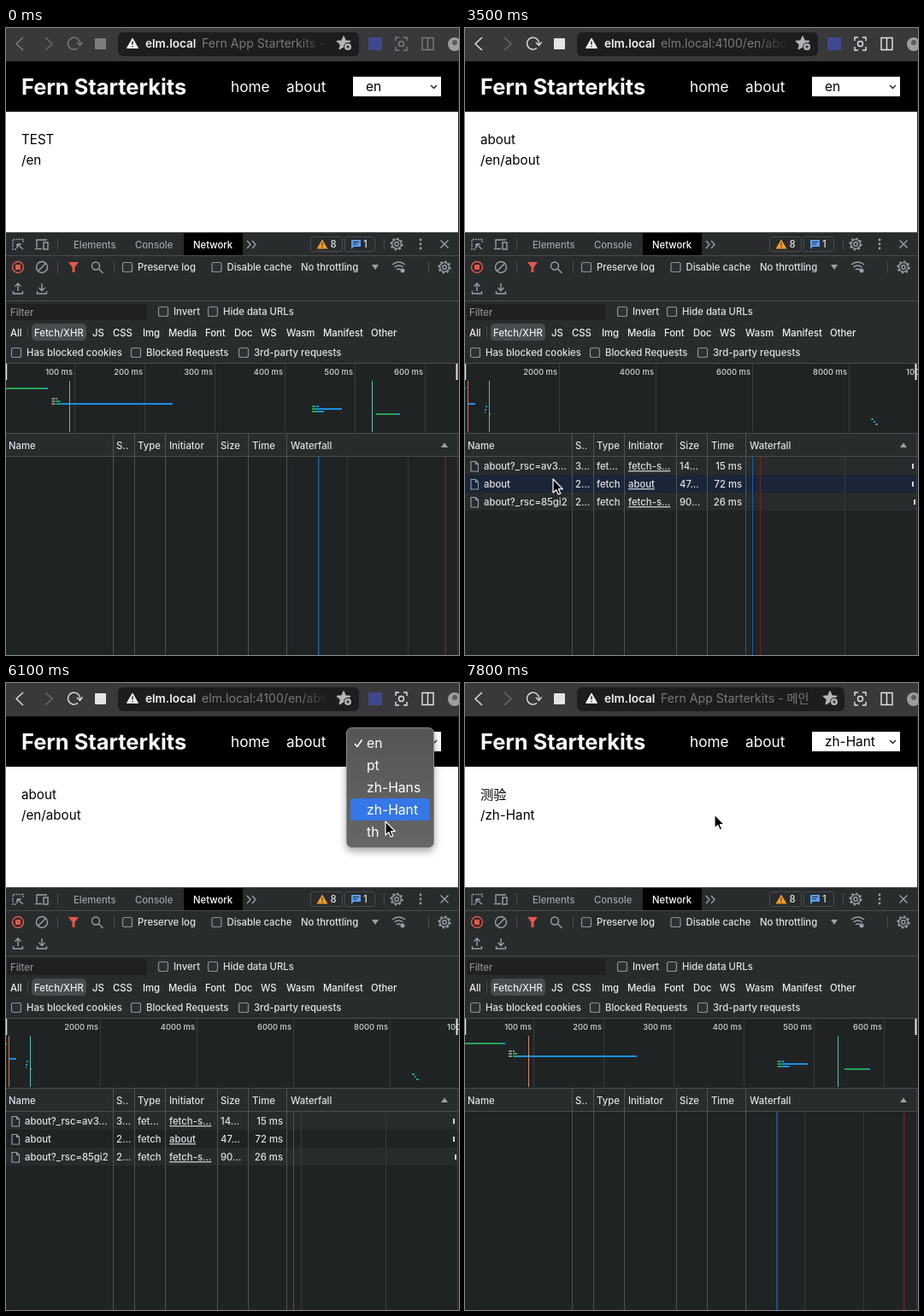
Recreate the animation shown at these times as an HTML page. Size 530 px wide and 734 px high, loop 8 s.

```html
<!DOCTYPE html>
<html lang="en">
<head>
<meta charset="utf-8">
<title>Language switch demo</title>
<style>
html, body { margin: 0; width: 100%; height: 100%; overflow: hidden; background: #202324; }
svg { display: block; width: 530px; height: 734px; font-family: Inter, "Noto Sans CJK SC", "Noto Sans CJK KR", sans-serif; }
text { white-space: pre; }
.ico { fill: none; stroke: #9aa0a6; stroke-width: 1.4; }
.tools { font-weight: 500; }

/* state switches */
.first, .home, .second, .about, .third, .hant, .idle, .live, .menu, .spot, .r0, .r1, .r2, .cursor { animation: 8s step-end infinite; }
.home { animation-name: home; }
.about { animation-name: about; }
.hant { animation-name: hant; }
.first { animation-name: first; }
.second { animation-name: second; }
.third { animation-name: third; }
.live { animation-name: live; }
.idle { animation-name: idle; }
.menu { animation-name: menu; }
.spot { animation-name: spot; }
.r0 { animation-name: r0; }
.r1 { animation-name: r1; }
.r2 { animation-name: r2; }
.cursor { animation-name: cursor; }
@keyframes home { 0% { visibility: visible } 32.5%, 100% { visibility: hidden } }
@keyframes about { 0% { visibility: hidden } 32.5% { visibility: visible } 86.25%, 100% { visibility: hidden } }
@keyframes hant { 0% { visibility: hidden } 86.25%, 100% { visibility: visible } }
@keyframes first { 0% { visibility: visible } 33.75%, 100% { visibility: hidden } }
@keyframes second { 0% { visibility: hidden } 33.75% { visibility: visible } 85%, 100% { visibility: hidden } }
@keyframes third { 0% { visibility: hidden } 87.5%, 100% { visibility: visible } }
@keyframes idle { 0% { visibility: visible } 17.5%, 100% { visibility: hidden } }
@keyframes live { 0% { visibility: hidden } 17.5%, 100% { visibility: visible } }
@keyframes menu { 0% { visibility: hidden } 65% { visibility: visible } 82.5%, 100% { visibility: hidden } }
@keyframes spot {
  0% { transform: translateY(0) } 67.5% { transform: translateY(26px) } 68.75% { transform: translateY(52px) }
  71.25% { transform: translateY(78px) } 72.5% { transform: translateY(104px) } 76.25%, 100% { transform: translateY(78px) }
}
@keyframes r0 { 0% { visibility: hidden } 53.75% { visibility: visible } 55%, 100% { visibility: hidden } }
@keyframes r1 { 0% { visibility: hidden } 43.75% { visibility: visible } 45%, 100% { visibility: hidden } }
@keyframes r2 { 0% { visibility: hidden } 45% { visibility: visible } 46.25% { visibility: hidden } 52.5% { visibility: visible } 53.75%, 100% { visibility: hidden } }
@keyframes cursor {
  0% { transform: translate(277px, 760px) }
  1.25% { transform: translate(277px, 645px); animation-timing-function: steps(2) }
  3.75% { transform: translate(427px, 275px) }
  5% { transform: translate(427px, 275px); animation-timing-function: steps(9) }
  16.25% { transform: translate(361px, 76px); animation-timing-function: steps(6) }
  23.75% { transform: translate(357px, 71px) }
  30% { transform: translate(357px, 71px); animation-timing-function: steps(8) }
  40% { transform: translate(260px, 217px) }
  42.5% { transform: translate(185px, 390px) }
  43.75% { transform: translate(103px, 528px); animation-timing-function: steps(5) }
  50% { transform: translate(72px, 597px); animation-timing-function: steps(2) }
  52.5% { transform: translate(80px, 563px); animation-timing-function: steps(6) }
  60% { transform: translate(300px, 290px); animation-timing-function: steps(3) }
  63.75% { transform: translate(441px, 67px) }
  65% { transform: translate(441px, 63px) }
  66.25% { transform: translate(441px, 63px); animation-timing-function: steps(5) }
  72.5% { transform: translate(446px, 178px) }
  73.75% { transform: translate(446px, 178px); animation-timing-function: steps(3) }
  77.5% { transform: translate(443px, 154px) }
  85% { transform: translate(443px, 154px); animation-timing-function: steps(6) }
  92.5% { transform: translate(375px, 187px) }
  95% { transform: translate(375px, 187px); animation-timing-function: steps(2) }
  97.5%, 100% { transform: translate(292px, 154px) }
}
</style>
</head>
<body>
<svg id="stage" viewBox="0 0 530 734"></svg>
<script>
const GREEN = '#25a455', BLUE = '#1a8fe0', GREY = '#85898d', LIGHT = '#dfe1e4', DIM = '#9aa0a6', EDGE = '#494c4e';

const box = (x, y, w, h, fill, more = '') => `<rect x="${x}" y="${y}" width="${w}" height="${h}" fill="${fill}" ${more}/>`;
const hline = (y, c = EDGE) => box(0, y, 530, 1, c);
const vline = (x, y, h, c = EDGE, w = 1) => box(x, y, w, h, c);
// y is the middle of the capitals
const text = (x, y, s, fill = LIGHT, size = 11.3, more = '') =>
  `<text x="${x}" y="${y + size * .364}" fill="${fill}" font-size="${size}" ${more}>${s}</text>`;
const path = (d, more = '') => `<path class="ico" d="${d}" ${more}/>`;
const group = (cls, ...parts) => `<g class="${cls}">${parts.join('')}</g>`;
const at = (x, y, s) => `<g transform="translate(${x} ${y})">${s}</g>`;
const check = (x, y, label) =>
  box(x - 5.5, y - 5.5, 11, 11, '#2e3133', 'rx="2" stroke="#8d9195" stroke-width="1.2"') + text(x + 12, y, label);

function star(x) {
  let d = '';
  for (let i = 0; i < 10; i++) {
    const a = i * Math.PI / 5 - Math.PI / 2, r = i % 2 ? 3.6 : 8;
    d += (i ? 'L' : 'M') + (Math.cos(a) * r).toFixed(1) + ' ' + (Math.sin(a) * r).toFixed(1);
  }
  return at(x, 18, `<path d="${d}Z" fill="#b4b5b7" stroke="#b4b5b7" stroke-width="1.5" stroke-linejoin="round"/>
    <circle cx="5" cy="4" r="5" fill="#1d1d1f"/><circle cx="5" cy="4" r="4" fill="#b4b5b7"/>
    <path d="M3 4h4M5 2v4" stroke="#1d1d1f"/>`);
}

function gear(x, y) {
  return at(x, y, `<circle r="5.4" class="ico"/><circle r="2.2" class="ico"/>
    <circle r="6.7" class="ico" style="stroke-width:1.8;stroke-dasharray:2.4 2.86"/>`);
}

function browserIcons(c) {
  const s = `style="stroke:${c}"`;
  return path('M20 11l-8 7.5 8 7.5', s) + path('M84 23.5a7 7 0 1 1 2.5-5M83 17l3.5 3.5 3-4', s)
    + box(104, 12, 13, 13, c, 'rx="1"')
    + path('M456 15v-4h4M465 11h4v4M469 22v4h-4M460 26h-4v-4', s) + `<circle cx="462.5" cy="18.5" r="3" class="ico" ${s}/>`
    + path('M487 11.5h13v14h-13zM493.5 11.5v14', s);
}

function browser() {
  const host = text(163, 18, 'elm.local', '#f1f1f2', 13.6, 'font-weight="600"');
  const pill = (w) => box(131, 5, w, 28, '#1d1d1f', 'rx="6"');
  const warn = `<path d="M148 12l6.5 11.5h-13z" fill="#f1f1f2" stroke="#f1f1f2" stroke-linejoin="round"/><path d="M148 15.5v4M148 21v1.3" stroke="#1d1d1f" stroke-width="1.4"/>`;
  const title = (s) => text(229, 18, s, '#77797c', 14.1);
  const flagIcon = box(424, 11, 16, 15, '#41488f');
  const cut = box(340, 8, 38, 22, 'url(#fade)') + box(378, 8, 34, 22, '#1d1d1f') + star(395);
  return box(0, 0, 530, 39, '#39393b')
    + group('idle', browserIcons('#7c7d7f')) + group('live', browserIcons('#e4e4e6'))
    + path('M46 11l8 7.5-8 7.5', 'style="stroke:#69696b"')
    + `<circle cx="525" cy="19" r="8" fill="#9d9da0"/><circle cx="525" cy="17" r="3" fill="#5b5b5e"/>`
    + group('home', pill(282), title('Fern App Starterkits -'), cut, flagIcon)
    + group('about', pill(282), title('elm.local:4100/en/about'), cut, flagIcon)
    + group('hant', pill(313), title('Fern App Starterkits - 메인'), star(427))
    + warn + host;
}

function page() {
  const body = (cls, a, b) => group(cls, text(18, 130, a, '#000', 15.2), text(18, 154, b, '#000', 15.2));
  const value = (cls, s) => group(cls, text(421, 68.5, s, '#000', 15.4));
  return box(0, 39, 530, 59, '#000') + box(0, 98, 530, 141, '#fff')
    + text(18, 68.5, 'Fern Starterkits', '#fff', 25.4, 'font-weight="700"')
    + text(263, 68.5, 'home', '#fff', 17.2) + text(328, 68.5, 'about', '#fff', 17.2)
    + box(406, 57, 103, 23, '#fff')
    + path('M497 67l3.5 3.5 3.5-3.5', 'style="stroke:#222"')
    + value('home', 'en') + value('about', 'en') + value('hant', 'zh-Hant')
    + body('home', 'TEST', '/en') + body('about', 'about', '/en/about') + body('hant', '测验', '/zh-Hant')
    + vline(529, 39, 200, '#222');
}

function toolbars() {
  let s = box(0, 239, 530, 154, '#292c2d') + hline(239) + hline(266) + hline(319) + hline(392)
    + box(208, 240, 69, 26, '#000');
  s += path('M12 259H8v-11.5h12v4', 'style="stroke-dasharray:2 1.2"') + path('M13 253l7 6M13 253v5M13 253h5')
    + path('M36 257v-9h12M34 258.5h8M44 251h5v8h-5z') + vline(60, 246, 14);
  s += text(79, 253.5, 'Elements', DIM) + text(151, 253.5, 'Console', DIM) + text(219, 253.5, 'Network', '#fff')
    + path('M282 249l4 4.5-4 4.5M288 249l4 4.5-4 4.5');
  s += box(356.5, 244.5, 37, 17, 'none', `rx="2" stroke="${EDGE}"`) + `<path d="M370 247.5l6.5 11h-13z" fill="#f29a2e"/><path d="M370 251v4M370 256v1.3" stroke="#292c2d"/>`
    + text(379.5, 253, '8') + box(396.5, 244.5, 35, 17, 'none', `rx="2" stroke="${EDGE}"`)
    + `<path d="M404 248h11v8h-8l-3 3z" fill="#5a9cf0"/><path d="M406 250.5h7M406 253h5" stroke="#292c2d"/>` + text(418, 253, '1')
    + vline(442, 246, 14) + gear(457, 253)
    + [248, 253, 258].map(y => `<circle cx="485" cy="${y}" r="1.4" fill="${DIM}"/>`).join('')
    + path('M508.5 248.5l9 9M517.5 248.5l-9 9');
  s += `<circle cx="14" cy="280" r="6.5" class="ico" style="stroke:#e4564b"/>` + box(11, 277, 6, 6, '#e4564b', 'rx="1"')
    + `<circle cx="42" cy="280" r="6.5" class="ico"/>` + path('M46.5 275.5l-9 9') + vline(60, 273, 14)
    + `<path d="M73 274h12l-4.5 6v6h-3v-6z" fill="#e4564b"/>`
    + `<circle cx="105" cy="278.5" r="4.5" class="ico"/>` + path('M108.5 282l5 5') + vline(126, 273, 14)
    + check(142, 280, 'Preserve log') + check(246.5, 280, 'Disable cache')
    + text(345, 280, 'No throttling') + `<path d="M428 277h8l-4 6z" fill="${DIM}"/>`
    + path('M452 277q7.5-6 15 0M454.5 280q5-4 10 0M457 283q2.5-2 5 0') + `<circle cx="464" cy="284" r="2.5" fill="${DIM}"/>`
    + vline(494, 273, 14) + gear(513, 280)
    + path('M14 308v-9M10.5 302.5l3.5-3.5 3.5 3.5M8.5 308v3h11v-3') + path('M42 299v8M38.5 304l3.5 3.5 3.5-3.5M36.5 308v3h11v-3');
  s += box(2, 323, 163, 19, '#1e2021') + text(5, 333, 'Filter', '#8b8f93')
    + check(184, 332, 'Invert') + check(242, 332, 'Hide data URLs')
    + box(30, 346, 64, 20, '#494c4e', 'rx="5"') + vline(25, 349, 14);
  const types = { All: 5, 'Fetch/XHR': 33, JS: 101, CSS: 125, Img: 160, Media: 190, Font: 233, Doc: 267, WS: 298, Wasm: 328, Manifest: 371, Other: 427 };
  for (const k in types) s += text(types[k], 356.5, k, '#eceef0');
  return s + check(12, 380, 'Has blocked cookies') + check(152, 380, 'Blocked Requests') + check(278, 380, '3rd-party requests');
}

// [from, to, y, colour] strips of the overview
const strips = (list) => list.map(([a, b, y, c]) => box(a, y - 1, b - a, 2, c)).join('');

function ruler(first, gap, unit) {
  let s = '';
  for (let i = 0; first + i * gap < 600; i++) {
    const x = first + i * gap;
    if (x < 530) s += vline(x, 393, 80, '#383b3d');
    s += text(x - 2, 403, unit * (i + 1) + ' ms', '#d0d3d6', 9.4, 'text-anchor="end"');
  }
  return s;
}

function loadTrace(cls, k) {
  const { a, c, y, end, b, mid, tail, last, teal, grid, blue, red } = k;
  return group(cls, ruler(80, 82, 100),
    strips([[0, a, 422, GREEN], [a, a + 3, 422, BLUE],
      [c, c + 4, y, GREY], [c + 5, c + 7, y, GREY], [c, c + 4, y + 3, GREY], [c + 5, c + 10, y + 3, GREEN],
      [c, c + 4, y + 6, GREY], [c + 5, c + 10, y + 6, GREEN], [c + 10, end, y + 6, BLUE],
      [b, b + 4, 443, GREEN], [b + 5, b + 8, 443, BLUE], [b, b + 5, 446, GREEN], [b + 5, mid, 446, BLUE],
      [b, b + 6, 449, GREEN], [b + 6, b + 14, 449, BLUE], [tail, last, 452, GREEN], [last, last + 3, 452, BLUE]]),
    vline(74, 413, 60, '#c98a6c'), vline(teal, 413, 60, '#5cc0b4'),
    ...grid.map(x => vline(x, 502, 232, '#36393b')),
    vline(blue, 502, 232, '#1c66b0', 1.4), vline(red, 502, 232, '#7f1d1b', 1.4));
}

function requests() {
  const rows = [
    ['about?_rsc=av3…', '3…', 'fet…', 'fetch-s…', '14…', '15 ms', 523],
    ['about', '2…', 'fetch', 'about', '47…', '72 ms', 523],
    ['about?_rsc=85gi2', '2…', 'fetch', 'fetch-s…', '90…', '26 ms', 525]];
  const xs = [22, 129, 154, 191, 251];
  let s = ruler(110, 113, 2000)
    + strips([[0, 1, 422, GREEN], [4, 12, 440, BLUE], [24, 26, 443, BLUE], [23, 25, 447, BLUE], [23, 24, 450, GREEN], [29, 30, 452, GREEN],
      [475, 478, 458, GREEN], [478, 480, 461, BLUE], [480, 483, 464, GREEN]])
    + vline(3, 413, 60, '#d9764a') + vline(28, 413, 60, '#5cc0b4');
  rows.forEach((r, i) => {
    const y = 502 + 21 * i;
    if (i % 2 == 0) s += box(0, y, 528, 21, '#282b2c');
    s += group('r' + i, box(0, y, 528, 21, '#1a2538'));
  });
  s += vline(444, 502, 232, '#36393b') + vline(336, 502, 232, '#1c5c9c') + vline(345, 502, 232, '#7f1d1b');
  rows.forEach((r, i) => {
    const y = 513 + 21 * i;
    s += path(`M7 ${y - 5.5}h5.5l3 3v8.5h-8.5zM12.5 ${y - 5.5}v3h3`, 'style="stroke-width:1.1"');
    xs.forEach((x, j) => s += text(x, y, r[j], LIGHT, 11.3, j == 3 ? 'text-decoration="underline"' : ''));
    s += text(324, y, r[5], LIGHT, 11.3, 'text-anchor="end"') + box(r[6], y - 3, 2, 6, '#cfd8d8');
  });
  return group('second', s);
}

function network() {
  const heads = { Name: 3, 'S..': 129, Type: 154, Initiator: 191, Size: 251, Time: 288, Waterfall: 333 };
  let s = box(0, 393, 530, 341, '#202324') + box(0, 475, 530, 26, '#292c2d') + hline(474) + hline(501);
  s += loadTrace('first', { a: 46, c: 53.5, y: 434, end: 195, b: 358, mid: 393, tail: 433, last: 458, teal: 428, grid: [399, 470], blue: 365, red: 513.5 });
  s += requests();
  s += loadTrace('third', { a: 44, c: 51, y: 431, end: 201, b: 365.5, mid: 401, tail: 444, last: 471, teal: 436, grid: [397, 466], blue: 364.3, red: 513 });
  for (const k in heads) s += text(heads[k], 488.5, k);
  for (const x of [125, 150, 186, 247, 283, 328]) s += vline(x, 475, 259, '#505355');
  return s + `<path d="M509 491h8l-4-5.5z" fill="${DIM}"/>` + vline(528, 475, 259, '#3c3f41')
    + vline(0, 393, 19, '#e6e6e6', 1.2) + vline(526.5, 393, 19, '#e6e6e6', 2);
}

function menu() {
  const items = ['en', 'pt', 'zh-Hans', 'zh-Hant', 'th'];
  return group('menu',
    box(398.5, 52.5, 102, 140, 'url(#glass)', 'rx="6" stroke="#8b8b8c" filter="url(#shade)"'),
    group('spot', box(403, 57, 93, 26, '#3577e6', 'rx="4"')),
    path('M408 71l3 3.5 5.5-8', 'style="stroke:#fff;stroke-width:1.6"'),
    ...items.map((s, i) => text(422, 70 + 26 * i, s, '#fff', 15.7)));
}

document.getElementById('stage').innerHTML = `<defs>
  <linearGradient id="fade"><stop stop-color="#1d1d1f" stop-opacity="0"/><stop offset="1" stop-color="#1d1d1f"/></linearGradient>
  <linearGradient id="glass" x2="0" y2="1"><stop stop-color="#555657"/><stop offset="1" stop-color="#656667"/></linearGradient>
  <filter id="shade" x="-20%" y="-20%" width="140%" height="140%"><feDropShadow dx="0" dy="4" stdDeviation="5" flood-opacity=".35"/></filter>
  </defs>` + browser() + page() + group('tools', toolbars(), network()) + menu()
  + group('cursor', '<path d="M0 0V16L3.7 12.6 6.2 18 8.8 16.9 6.4 11.7H11.3Z" fill="#000" stroke="#fff" stroke-width="1.2" stroke-linejoin="round"/>');
</script>
</body>
</html>
```
